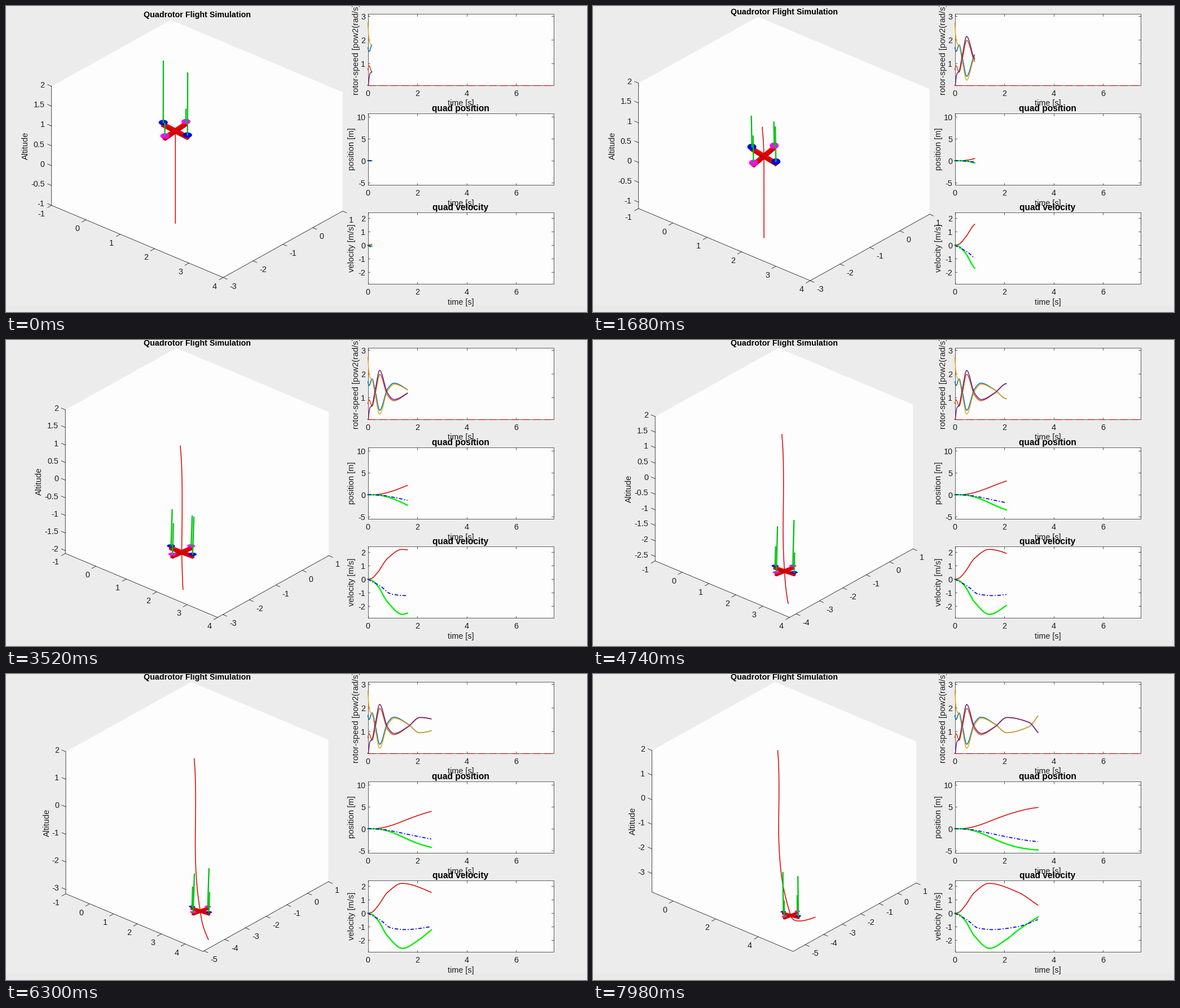
A matplotlib script for the animation above (8000 ms loop, 1030 by 544 pixels).

```python
import numpy as np
import matplotlib.pyplot as plt
from matplotlib.animation import FuncAnimation
from matplotlib.patches import Rectangle

W, H, DPI = 1030, 544, 100
LOOP, INTERVAL = 8000, 40
PX = 72 / DPI  # one pixel in points

plt.rcParams["font.family"] = "Liberation Sans"
plt.rcParams["path.simplify"] = False

BACK, PAPER, INK = "#ececec", "#fdfdfd", "#1e1e1e"
RED, GREEN, BLUE, MAGENTA = "#dc0000", "#00f000", "#0000e6", "#ff00ff"
THRUST = "#00c010"

fig = plt.figure(figsize=(W / DPI, H / DPI), dpi=DPI, facecolor=BACK)
ax = fig.add_axes([0, 0, 1, 1])
ax.set_xlim(0, W)
ax.set_ylim(H, 0)
ax.axis("off")


# ---------- drawing helpers, all in pixel coordinates ----------
def stroke(pts, color, width, z, **kw):
    pts = np.asarray(pts, float)
    return ax.plot(pts[:, 0], pts[:, 1], color=color, lw=width * PX,
                   zorder=z, **kw)[0]


def segments(pairs, color, width, z):
    gap = [(np.nan, np.nan)]
    return stroke([p for a, b in pairs for p in [a, b] + gap], color, width, z)


def shape(pts, color, z, edge="none", width=0.0):
    pts = np.asarray(pts)
    return ax.fill(pts[:, 0], pts[:, 1], fc=color, ec=edge, lw=width * PX,
                   zorder=z)[0]


def label(x, y, s, size=14.4, ha="center", va="center_baseline", z=8, **kw):
    return ax.text(x, y, s, fontsize=size * PX, ha=ha, va=va, zorder=z,
                   **{"color": INK, **kw})


def curve(keys, t):
    """Smooth curve through key points, flat at every turning point."""
    ts, vs = np.array(keys, float).T
    s = np.diff(vs) / np.diff(ts)
    a, b = s[:-1], s[1:]
    bend = a * b > 0
    m = np.r_[s[0], np.where(bend, 2 * a * b / np.where(bend, a + b, 1), 0), s[-1]]
    i = np.clip(np.searchsorted(ts, t, "right") - 1, 0, len(ts) - 2)
    h = ts[i + 1] - ts[i]
    u = (t - ts[i]) / h
    return ((1 + 2 * u) * (1 - u) ** 2 * vs[i] + u * (1 - u) ** 2 * h * m[i]
            + u * u * (3 - 2 * u) * vs[i + 1] + u * u * (u - 1) * h * m[i + 1])


# ---------- flight model ----------
STEP, DT, END, GRAVITY = 0.16, 0.01, 3.36, 9.81
T = np.arange(0, END + DT / 2, DT)

VEL = np.array([
    curve([(0, 0), (0.15, 0.06), (0.4, 0.52), (0.8, 1.55), (1.38, 2.21),
           (2.56, 1.55), (END, 0.6)], T),
    curve([(0, 0), (0.15, -0.08), (0.4, -0.5), (0.8, -1.7), (1.4, -2.6),
           (2.08, -1.95), (2.56, -1.25), (END, -0.28)], T),
    curve([(0, 0), (0.5, -0.5), (0.95, -1.1), (1.5, -1.21), (2.56, -0.99),
           (END, -0.47)], T)])
POS = np.zeros_like(VEL)
POS[:, 1:] = np.cumsum((VEL[:, 1:] + VEL[:, :-1]) / 2 * DT, axis=1)

# the vehicle leans into its acceleration
TILT = -np.gradient(VEL[:2], DT, axis=1) / GRAVITY

# opposite rotor pairs swing against each other around hover speed
HOVER = 1.2 + 0.03 * T
SWING = curve([(0, 0.46), (0.05, 0.3), (0.17, 0.58), (0.3, 0.05), (0.48, -0.76),
               (0.8, 0.14), (1.05, 0.37), (1.6, 0.08), (2.1, -0.32),
               (3.0, -0.09), (END, 0.35)], T)
TWIST = 1.6 * np.exp(-T / 0.11) - 0.55 * np.exp(-T / 0.45)
ROTORS = {"#0068ae": HOVER + SWING,
          "#cf4a12": HOVER - SWING,
          "#e8a91c": HOVER + SWING + TWIST,
          "#66207e": HOVER - SWING - TWIST}
SPEED = np.maximum(list(ROTORS.values()), 0.07)


def step_at(ms):
    """Simulation step on screen; it advances at a slightly uneven pace."""
    sway = np.sin(2 * np.pi * (ms - 500) / LOOP)
    return int(1.5 + ms / 404 + 0.35 * sway)


# ---------- right-hand charts ----------
X0, X1, SEC = 641.5, 970.5, 43.83


class Chart:
    def __init__(self, top, bottom, zero, unit, ticks, name, title=None):
        self.zero, self.unit = zero, unit
        ax.add_patch(Rectangle((X0, top), X1 - X0, bottom - top, fc=PAPER,
                               ec="none", zorder=3))
        stroke([(X0, top), (X1, top), (X1, bottom), (X0, bottom), (X0, top)],
               INK, 0.7, 4)
        marks = []
        for v in range(0, 8, 2):
            x = X0 + v * SEC
            marks += [((x, bottom), (x, bottom - 3.5)), ((x, top), (x, top + 3.5))]
            label(x, bottom + 13.5, str(v))
        for v in ticks:
            y = self.y(v)
            marks += [((X0, y), (X0 + 3.5, y)), ((X1, y), (X1 - 3.5, y))]
            label(637.5, y + 0.5, str(v), ha="right")
        segments(marks, INK, 0.7, 4)
        label(806, bottom + 31, "time [s]")
        label(613 if ticks[0] < 0 else 620.5, (top + bottom) / 2, name, size=14.7,
              va="center", rotation=90)
        if title:
            label(806, top - 10.5, title, size=15.5, weight="bold", color="black")

    def y(self, v):
        return self.zero - np.asarray(v) * self.unit

    def line(self, color, width, **kw):
        return stroke([(X0, self.zero)], color, width, 5, **kw)

    def show(self, lines, values, n):
        for line, v in zip(lines, values):
            line.set_data(X0 + T[:n] * SEC, self.y(v[:n]))


ax.add_patch(Rectangle((0, 533), W, 11, fc="#e9e9e9", ec="none", zorder=0))

speed = Chart(14, 141, 144, 42, range(1, 4), "rotor-speed [pow2(rad/s]")
place = Chart(191, 318, 275, 7.83, range(-5, 11, 5), "position [m]", "quad position")
veloc = Chart(367, 494, 425.3, 24, range(-2, 3), "velocity [m/s]", "quad velocity")

stroke([(X0, 140.5), (966, 140.5)], "#d01818", 1.3, 5, dashes=(10, 5))
speed_lines = [speed.line(c, 1.5) for c in ROTORS]
STYLES = [(RED, 1.5, {}), (GREEN, 2.4, {}),
          (BLUE, 1.7, {"dashes": (3.6, 1.8, 1, 1.8)})]
place_lines = [place.line(c, w, **kw) for c, w, kw in STYLES]
veloc_lines = [veloc.line(c, w, **kw) for c, w, kw in STYLES]


# ---------- 3D scene ----------
AZ, EL = np.radians(41), np.radians(29)
VIEW = np.array([[np.cos(AZ), np.sin(AZ) * np.sin(EL)],
                 [np.sin(AZ), -np.cos(AZ) * np.sin(EL)],
                 [0, -np.cos(EL)]])
CENTRE = np.array([338.7, 253.7])
ROOM = 0.82


class Scene:
    """Axis limits that grow with the vehicle, fitted into a fixed area."""

    def __init__(self, p):
        self.lo = np.array([-1, min(-3, p[1] - ROOM), min(-1, p[2] - ROOM)])
        self.hi = np.array([max(4, p[0] + ROOM), 1, 2])
        w, h = (self.hi - self.lo) @ np.abs(VIEW)
        self.s = min(516 / w, 479 / h)
        self.top = CENTRE[1] - h * self.s / 2

    def at(self, pts):
        mid = (self.lo + self.hi) / 2
        return CENTRE + (np.asarray(pts, float) - mid) @ VIEW * self.s


def ticks(lo, hi, step):
    return np.arange(np.ceil(lo / step - 1e-6), np.floor(hi / step + 1e-6) + 1) * step


def draw_axes(sc):
    (x0, y0, z0), (x1, y1, z1) = sc.lo, sc.hi
    ring = sc.at([(x0, y0, z1), (x0, y0, z0), (x1, y0, z0),
                  (x1, y1, z0), (x1, y1, z1), (x0, y1, z1)])
    out = [shape(ring, PAPER, 1), stroke(ring[:4], INK, 0.8, 2)]
    marks = []

    def tick(pt, d, off, v, ha):
        p = sc.at(pt)
        marks.append((p, p + d))
        out.append(label(p[0] + off[0], p[1] + off[1], f"{v + 0:g}", ha=ha, z=2))

    for v in ticks(x0, x1, 2 if x1 - x0 > 6 else 1):
        tick((v, y0, z0), (-7, 4), (-11, 14.5), v, "right")
    for v in ticks(y0, y1, 1):
        tick((x1, v, z0), (7, 3), (11.5, 14.5), v, "left")
    fine = z1 - z0 < 5
    for v in ticks(z0, z1, 0.5 if fine else 1):
        tick((x0, y0, v), (-7, -3), (-12, -3.5), v, "right")
    out.append(segments(marks, INK, 0.8, 2))
    left = (ring[0] + ring[1]) / 2
    out.append(label(left[0] - (46 if fine else 33), left[1], "Altitude", size=14.6,
                     va="center", rotation=90, z=2))
    out.append(label(339, sc.top - 10, "Quadrotor Flight Simulation", size=14.2,
                     weight="bold", color="black"))
    return out


def draw_path(sc, n, t):
    """Flown path, then the planned one, which shortens and hooks away."""
    trail = sc.at(POS[:, :n].T)
    p, f = trail[-1], t / END
    drop = curve([(0, 2.1), (1.28, 1.53), (1.6, 0.92), (2.56, 0.9), (END, 0.06)], t)
    c = p + sc.s * np.array([0.08 * f ** 3, max(drop / 2, 0.36)])
    e = p + sc.s * np.array([0.86 * f ** 4.5, drop])
    u = np.linspace(0, 1, 30)[:, None]
    ahead = (1 - u) ** 2 * p + 2 * u * (1 - u) * c + u * u * e
    return [stroke(np.vstack([trail, ahead]), RED, 1.5, 2.5)]


ARM, HALF, RISE, DISC = 0.355, 0.038, 0.06, 0.1
RIM = np.linspace(0, 2 * np.pi, 32)


def draw_quad(sc, pos, tilt, w):
    a, b = tilt
    body = np.array([(1, 0, a), (0, 1, b), (-a, -b, 1)])
    body /= np.linalg.norm(body, axis=1)[:, None]

    def at(pts):
        return sc.at(pos + np.asarray(pts, float) @ body)

    end, h = ARM + 0.025, HALF
    out = []
    for ex, ey in ((h, end), (end, h)):
        top = [(-ex, -ey, h), (ex, -ey, h), (ex, ey, h), (-ex, ey, h)]
        near = [(-ex, -ey, h), (ex, -ey, h), (ex, -ey, -h), (-ex, -ey, -h)]
        side = [(ex, -ey, h), (ex, ey, h), (ex, ey, -h), (ex, -ey, -h)]
        for face, color in ((near, "#d40000"), (side, "#d40000"), (top, "#f00000")):
            out.append(shape(at(face), color, 2.6, "#900000", 0.006 * sc.s))

    blue, orange, yellow, purple = w
    hubs = [(0, ARM, MAGENTA, orange), (-ARM, 0, BLUE, yellow),
            (0, -ARM, MAGENTA, purple), (ARM, 0, BLUE, blue)]
    for x, y, color, v in hubs:
        rim = np.column_stack([x + DISC * np.cos(RIM), y + DISC * np.sin(RIM),
                               np.full(len(RIM), RISE)])
        out.append(shape(at(rim), color, 2.7))
        bar = [(x, y, RISE), (x, y, RISE + 0.14 + 0.49 * v * v)]
        out.append(stroke(at(bar), THRUST, 2.3, 2.8))
    return out


moving = []


def draw(i):
    t = step_at(i * INTERVAL) * STEP
    last = int(round(t / DT))
    n = last + 1
    for art in moving:
        art.remove()
    pos = POS[:, last]
    sc = Scene(pos)
    moving[:] = (draw_axes(sc) + draw_path(sc, n, t)
                 + draw_quad(sc, pos, TILT[:, last], SPEED[:, last]))
    speed.show(speed_lines, SPEED, n)
    place.show(place_lines, POS, n)
    veloc.show(veloc_lines, VEL, n)
    return []


def start():
    return draw(0)


anim = FuncAnimation(fig, draw, frames=LOOP // INTERVAL, init_func=start,
                     interval=INTERVAL, repeat=True, repeat_delay=0, blit=False)
plt.show()
```
